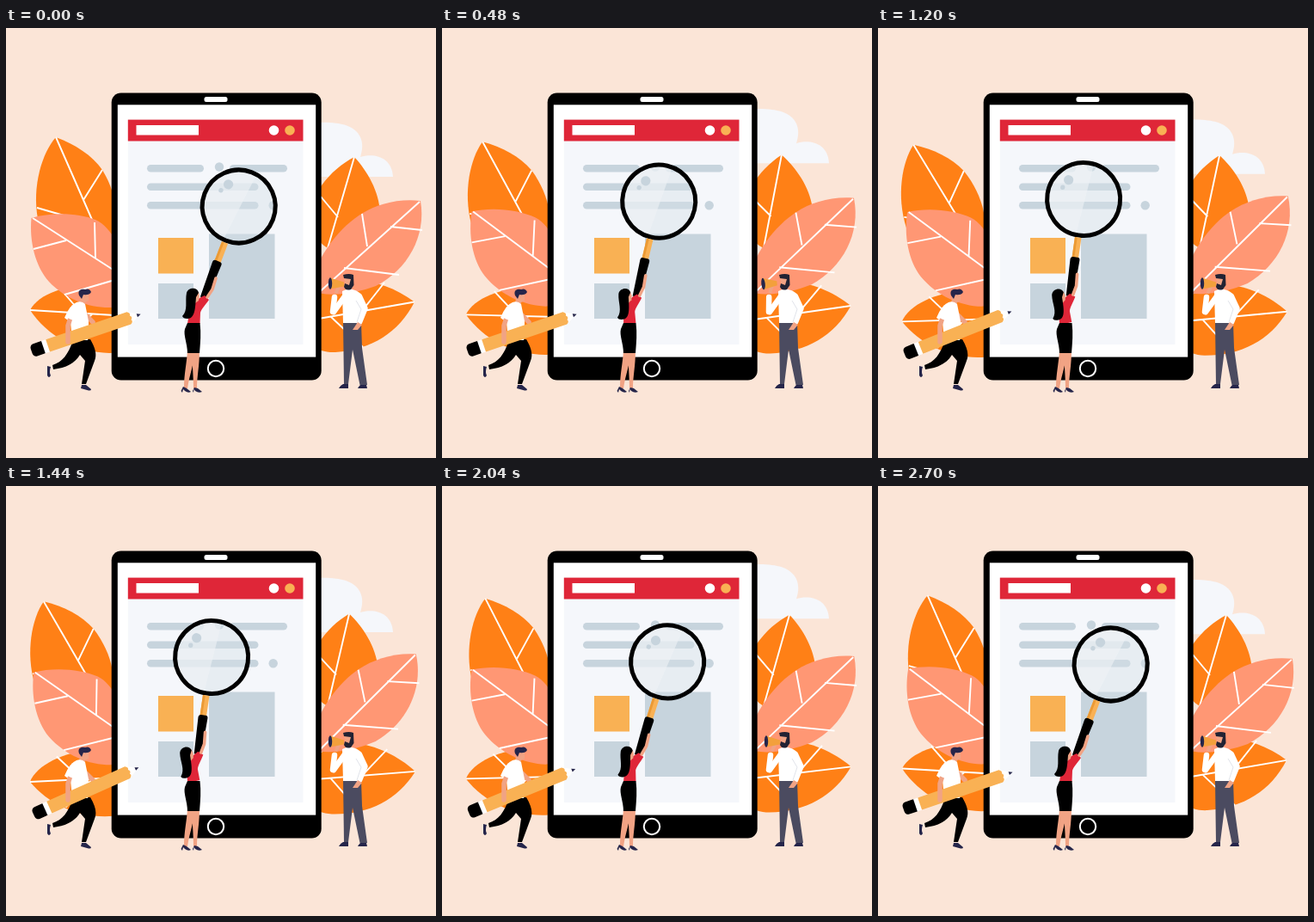
These frames come from a looping animation (500 by 500 pixels, 2730 ms). An HTML page:

```html
<!DOCTYPE html>
<html lang="en">
<head>
<meta charset="utf-8">
<title>Tablet search</title>
<style>
html, body { margin: 0; width: 100%; height: 100%; overflow: hidden; background: #fbe5d7; }
svg { display: block; width: 100vw; height: 100vh; }
.vein { fill: none; stroke: #fff; stroke-width: 1.9; }
.orange { fill: #ff8016; }
.pink { fill: #ff9774; }
.grey { fill: #c7d4dd; }
.gold { fill: #f9b154; }
.skin { fill: #f1a384; }
.navy { fill: #25254a; }
.limb { fill: none; stroke: #f1a384; stroke-linecap: round; stroke-linejoin: round; }
.sleeve { fill: none; stroke: #fff; stroke-width: 6.5; stroke-linecap: round; stroke-linejoin: round; }
</style>
</head>
<body>
<svg viewBox="0 0 500 500">
  <rect width="500" height="500" fill="#fbe5d7"/>

  <path id="cloud" fill="#f5f7fb" d="M340 173V114C358 108 382 109 395 113C412 119 418 132 412 150C428 145 449 150 450 173Z"/>

  <g id="leafTL">
    <path class="orange" d="M58 127C42 145 30 184 37 222C50 250 90 264 115 257C136 237 131 196 112 165C100 148 80 135 58 127Z"/>
    <path class="vein" d="M58 127L115 257M90 200L112 165M36 209L102 228"/>
  </g>
  <g id="leafBL">
    <path class="orange" d="M28 328C38 309 70 298 108 298C140 300 162 320 175 337C165 365 145 378 120 378C82 377 48 358 28 328Z"/>
    <path class="vein" d="M28 328L175 337M62 302L88 332M66 362L100 333"/>
  </g>
  <g id="leafML">
    <path class="pink" d="M29.500 221C53 214 84 215 104 223C123 231 138 262 140 290C142 312 138 322 123 325C98 326 70 316 50 295C34 277 27 248 29.500 221Z"/>
    <path class="vein" d="M31 221L140 291M103 226L104 268M32 257L70 247M68 310L140 289"/>
  </g>

  <g id="leafTR">
    <path class="orange" d="M405 150C420 166 434 190 435 215C435 240 410 264 374 256C346 238 352 202 367 183C378 168 390 158 405 150Z"/>
    <path class="vein" d="M405 150L374 256M366 196L386 220"/>
  </g>
  <g id="leafBR">
    <path class="orange" d="M475 318.500C453 302 425 292 402 293C380 295 350 310 335 340C345 367 362 378 383 377C425 374 457 354 475 318.500Z"/>
    <path class="vein" d="M475 318.500L335 343M440 296L414 329M378 336L415 371"/>
  </g>
  <g id="leafMR">
    <path class="pink" d="M482 201C456 198 432 205 415 215C390 230 362 262 352 305C375 314 405 309 430 300C467 281 489 242 482 201Z"/>
    <path class="vein" d="M481 202L360 311M414 216L420 254M447 231L484 235M393 279L457 287"/>
  </g>

  <rect x="122.700" y="75.500" width="244" height="334" rx="11"/>
  <rect x="129.800" y="89.300" width="230.400" height="293.300" fill="#fff"/>
  <rect x="230.500" y="80" width="27" height="6" rx="2.500" fill="#fff"/>
  <circle cx="244" cy="396" r="9.200" fill="none" stroke="#fff" stroke-width="2"/>
  <rect x="141.800" y="106.600" width="203.700" height="261.400" fill="#f5f7fb"/>
  <rect x="141.800" y="106.600" width="203.700" height="24.900" fill="#df2638"/>
  <rect x="151.500" y="113" width="72.500" height="11.500" fill="#fff"/>
  <circle cx="311.500" cy="119" r="5.800" fill="#fff"/>
  <circle class="gold" cx="330" cy="119" r="5.800"/>
  <g class="grey">
    <rect x="164" y="159" width="66" height="8.500" rx="4.250"/>
    <rect x="260" y="159" width="67" height="8.500" rx="4.250"/>
    <rect x="164" y="180.500" width="129.500" height="8.500" rx="4.250"/>
    <rect x="164" y="202" width="129.500" height="8.500" rx="4.250"/>
    <circle cx="248" cy="161.500" r="5.200"/>
    <circle cx="310.700" cy="206.300" r="5.200"/>
    <rect x="177" y="297" width="41" height="41"/>
    <rect x="236" y="239.500" width="76.500" height="98.500"/>
  </g>
  <rect class="gold" x="177" y="244" width="41" height="41.500"/>

  <!-- woman -->
  <path class="skin" d="M211 375L219 375C219 391 214 400 211 419L207 419C207 401 210 392 211 375ZM217 375L225 375C225 393 222 405 222 419L218 419C218 402 216 390 217 375Z"/>
  <path class="navy" d="M206 417L210 419L215 423Q212 425 208 422L206 420L205 424L203.500 422ZM219 418L223 419L228 423Q224 425 220 422L218.500 420L218 424L217 422Z"/>
  <g id="torso">
    <path class="limb" stroke-width="3.600" d="M225 318L237 300L240 292"/>
    <g transform="translate(270.700 207.500) rotate(21)">
      <circle r="42.500" fill="#d6dfe6" fill-opacity=".45"/>
      <path fill="#f1f4f7" fill-opacity=".6" d="M6 -42A42.500 42.500 0 1 0 -3 42.300Z"/>
      <circle class="grey" cx="-20.500" cy="-19.600" r="5.600"/>
      <circle class="grey" cx="-26.100" cy="-10.100" r="2.700"/>
      <circle r="42.500" fill="none" stroke="#000" stroke-width="5"/>
      <rect class="gold" x="-3.800" y="45" width="7.600" height="25"/>
      <rect x="-3.800" y="45" width="2.800" height="25" fill="#eb9a35"/>
      <path d="M-5.500 71Q-5.500 68 -2.500 68H2.500Q5.500 68 5.500 71L4.200 114H-4.200Z"/>
    </g>
    <path fill="#df2638" d="M217 320C222 315 227 313 231 311L236 316C232 322 227 327 226 331L225.500 344H211C213 334 212 326 217 320Z"/>
    <path class="limb" stroke-width="3.600" d="M234 313L240 304L244 291"/>
    <path class="skin" d="M219 307L224 307L225 312L224 317L220 320Z"/>
    <path d="M210 308C212 301 223 301 224 308L221 313C220 325 220 338 211 338Q206 338 205 335C212 328 208 318 210 308Z"/>
  </g>
  <path d="M211 343H225.500C227 355 226 366 225 378H211C211 367 206 357 208 350Z"/>

  <!-- runner -->
  <path d="M78 363L98 362C104 372 106 380 103 387L93 414H88L92 387L86 380C80 390 70 395 55 397L54 392C66 388 72 380 78 363Z"/>
  <path class="navy" d="M48 393L52 394Q50 400 52 404Q50 408 48 404ZM88 415H93L99 420Q99 422 96 421.500L87 419Z"/>
  <path class="skin" d="M87 309L96 309L96 317L92 319L91 323L85 320Z"/>
  <path class="navy" d="M85 311C83 305 87 303 92 304Q97 302 99 307Q97 311 90 310L88 315Z"/>
  <path class="limb" stroke-width="5.500" d="M92 333L101 342"/>
  <path fill="#fff" d="M82 319Q88 317 92 321L96 341C96 350 96 357 95 363H77L75 342L68 337Q74 322 82 319Z"/>
  <g id="pencil">
    <rect x="-69.500" y="-7.500" width="18" height="15" rx="4.500"/>
    <rect x="-55" y="-7.500" width="7" height="15" fill="#fff"/>
    <path fill="#fff" d="M50 -7.500L64 0L50 7.500Z"/>
    <path class="gold" d="M-49.500 -7.500H50Q54 -5 52 -2.500Q55 0 52 2.500Q54 5 50 7.500H-49.500Z"/>
    <path class="navy" d="M60 -2L64.500 0L60 2Z"/>
  </g>
  <path class="limb" stroke-width="5.500" d="M75 337L72 346L72 365"/>
  <path fill="#fff" d="M77 322L84 328L78 340L69 336Z"/>

  <!-- announcer -->
  <path fill="#4b4b60" d="M392 342H413L414 372L420 415H411.500L403 374L398 414H393Z"/>
  <path class="navy" d="M392 414H398V419H387Q388 416 392 414ZM412 415H419L420 419H409Q410 417 412 415Z"/>
  <path class="skin" d="M393 290H403V305H396Z"/>
  <path fill="#fff" d="M391 306Q398 302 406 305C411 307 414 310 415 316L413 343H392Z"/>
  <path d="M392 287Q399 285 404 287L404.500 299L401 304Q395 306 393 301L394 297L399 299L401 292L393 291Z" fill="#222233"/>
  <path class="sleeve" d="M411 312L417.500 326L411 342"/>
  <path fill="none" stroke="#d9dce4" stroke-width=".8" d="M407 317L413 327L408 342"/>
  <path class="skin" d="M409 342L414 345L409 351L403 351Z"/>
  <path class="sleeve" d="M394 312L381 330"/>
  <g id="horn">
    <path class="sleeve" d="M380 330L382 313"/>
    <path class="limb" stroke-width="4" d="M384 307L387 301"/>
    <path fill="#f3a03c" d="M377 290.500L393 295.500V300.500L377 303.500Z"/>
    <ellipse class="navy" cx="377" cy="297" rx="2.200" ry="6.700"/>
  </g>
</svg>
<script>
const LOOP = 2730, STEP = 30;

// Each track lists [ms, value] pairs joined by straight lines.
const spins = [
  ['leafTL', 115, 257, [[0, 0], [820, -8.3], [1060, -8.3], [LOOP, 0]]],
  ['leafBL', 175, 337, [[0, 0], [1685, -7.3], [LOOP, 0]]],
  ['leafML', 140, 290, [[0, 0], [590, 5], [930, 5.3], [1740, .5], [2150, 5.2], [2400, 5.2], [LOOP, 4.4]]],
  ['leafTR', 374, 256, [[0, 0], [480, -5.4], [930, -5.4], [2160, 0], [LOOP, 0]]],
  ['leafBR', 335, 335, [[0, 0], [1500, 5.7], [LOOP, 0]]],
  ['leafMR', 366, 305, [[0, 0], [820, -2.8], [1440, -2.8], [LOOP, 0]]],
  ['torso', 217, 344, [[0, 0], [810, -12.8], [1440, -12.8], [2270, 0], [LOOP, 0]]],
  ['horn', 380, 330, [[0, 0], [450, -6.5], [900, 0], [LOOP, 0]]]
];
const cloudY = [[0, 0], [575, -19], [1325, 0], [2035, -18.8], [LOOP, 0]];
const pencilTilt = [[0, -18.7], [930, -18.7], [1400, -24.1], [1710, -24.1], [LOOP, -18.7]];

const byId = id => document.getElementById(id);

function valueAt(track, t) {
  const i = track.findIndex(key => key[0] > t);
  const [t0, v0] = track[i - 1], [t1, v1] = track[i];
  return v0 + (v1 - v0) * (t - t0) / (t1 - t0);
}

function draw() {
  const t = Math.floor(performance.now() % LOOP / STEP) * STEP;
  for (const [id, x, y, track] of spins) {
    byId(id).setAttribute('transform', `rotate(${valueAt(track, t)} ${x} ${y})`);
  }
  byId('cloud').setAttribute('transform', `translate(0 ${valueAt(cloudY, t)})`);
  byId('pencil').setAttribute('transform', `translate(95.5 353.5) rotate(${valueAt(pencilTilt, t)})`);
  requestAnimationFrame(draw);
}
draw();
</script>
</body>
</html>
```
